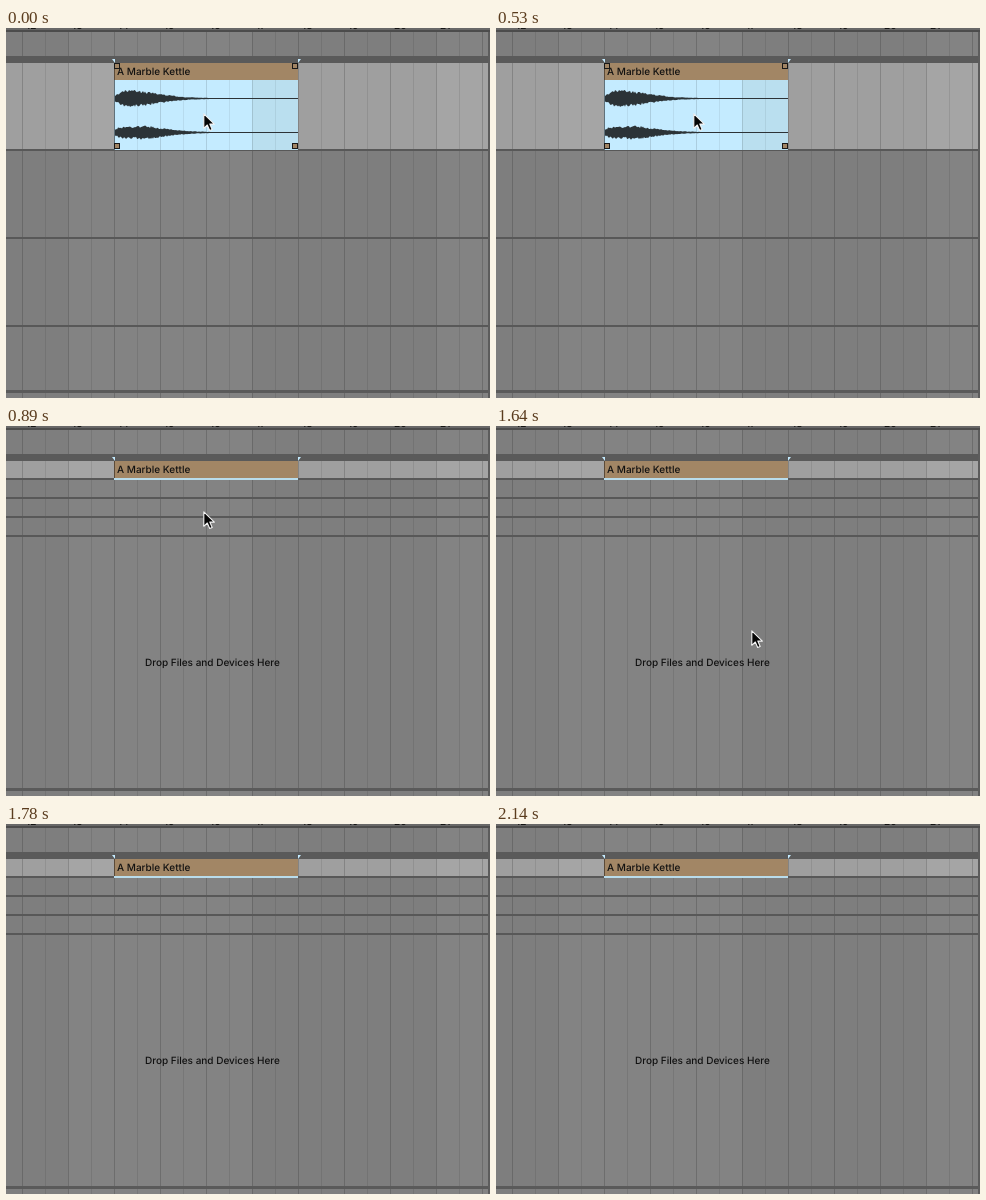
An HTML page for the animation above (2.38 s loop, 484x370 px).

```html
<!DOCTYPE html>
<html lang="en">
<head>
<meta charset="utf-8">
<title>Track fold</title>
<style>
  html, body { margin: 0; width: 100%; height: 100%; overflow: hidden; background: #808080; }
  svg { display: block; width: 484px; height: 370px; }
  text { font: 500 10px Inter, "Open Sans", sans-serif; fill: #111; text-rendering: geometricPrecision; }
  .open, .folded, #cursor { animation: 2380ms step-end infinite; }
  .open { animation-name: open; }
  .folded { animation-name: folded; }
  #cursor { animation-name: cursor; }
  @keyframes open { 0% { visibility: visible } 37.395%, 100% { visibility: hidden } }
  @keyframes folded { 0% { visibility: hidden } 37.395%, 100% { visibility: visible } }
  @keyframes cursor {
    0% { transform: translate(197px, 85px); visibility: visible }
    68.908% { transform: translate(255px, 204px); visibility: visible }
    74.79%, 100% { transform: translate(255px, 204px); visibility: hidden }
  }
</style>
</head>
<body>
<svg viewBox="0 0 484 370" shape-rendering="crispEdges">
  <defs>
    <pattern id="beats" width="46" height="370" x="16" patternUnits="userSpaceOnUse">
      <path d="M0 0h1v370h-1z" fill="#000" fill-opacity=".17"/>
      <path d="M23 0h1v370h-1z" fill="#000" fill-opacity=".09"/>
    </pattern>
    <pattern id="bands" width="368" height="370" x="62" patternUnits="userSpaceOnUse">
      <path d="M184 0h184v370H184z" fill="#000" fill-opacity=".04"/>
    </pattern>
    <g id="handle"><path d="M.5 .5h5v5h-5z" fill="#a08464" stroke="#181818"/></g>
  </defs>

  <path d="M0 0h484v370H0z" fill="#838383"/>
  <path class="open" d="M0 35h482v86H0z" fill="#a5a5a5"/>
  <path class="folded" d="M0 35h482v17H0z" fill="#a5a5a5"/>
  <path d="M0 3h482v367H0z" fill="url(#bands)"/>
  <path d="M0 3h482v367H0z" fill="url(#beats)"/>

  <path d="M0 0h484v2H0z" fill="#686868"/>
  <path d="M0 2h484v2H0z" fill="#4c4c4c"/>
  <g id="bars"></g>
  <path d="M0 28h484v7H0zM0 362h484v3H0z" fill="#5a5a5a"/>
  <path class="open" d="M0 121h482v2H0zM0 209h482v2H0zM0 297h482v2H0z" fill="#585858"/>
  <path class="folded" d="M0 52h482v2H0zM0 71h482v2H0zM0 90h482v2H0zM0 109h482v2H0z" fill="#585858"/>
  <path d="M482 4h2v366h-2z" fill="#5c5c5c"/>

  <path d="M108 35h184v17H108z" fill="#a28665"/>
  <path d="M108 35h1v17h-1z" fill="#5b4a38"/>
  <g class="open">
    <path d="M108 52h184v70H108z" fill="#c4ebff"/>
    <path d="M246 52h46v70h-46z" fill="#badfef"/>
    <path d="M109 52h183v70H109z" fill="url(#beats)" opacity=".75"/>
    <path d="M108 52h1v70h-1z" fill="#60717a"/>
    <g id="waves" fill="#2c3337" shape-rendering="auto"></g>
  </g>
  <path class="folded" d="M108 52h184v2H108z" fill="#b9dceb"/>
  <path d="M106 31h3v4zM295 31h-3v4z" fill="#c4ebff" shape-rendering="auto"/>
  <text x="111" y="47">A Marble Kettle</text>
  <g class="open">
    <use href="#handle" x="108" y="35"/>
    <use href="#handle" x="286" y="35"/>
    <use href="#handle" x="108" y="115"/>
    <use href="#handle" x="286" y="115"/>
  </g>
  <text class="folded" x="139" y="240">Drop Files and Devices Here</text>

  <g id="cursor" shape-rendering="auto">
    <path d="M.8 .8V15.3L4.3 12L6.7 17.5L9.2 16.4L6.8 11.1H11.4Z"
      fill="#050505" stroke="#f4f4f4" stroke-width="1.1" stroke-linejoin="round"/>
  </g>
</svg>
<script>
  const NS = "http://www.w3.org/2000/svg";

  function add(parent, tag, attrs, label = "") {
    const node = document.createElementNS(NS, tag);
    for (const key in attrs) node.setAttribute(key, attrs[key]);
    node.textContent = label;
    document.getElementById(parent).append(node);
  }

  for (let bar = 12; bar < 22; bar++) {
    add("bars", "text", { x: 20 + (bar - 12) * 46, y: 1 }, bar);
  }

  // Linear interpolation through [x, amplitude] points.
  function level(points, x) {
    const i = points.findIndex(p => p[0] >= x);
    if (i < 1) return points[0][1];
    const [x0, a0] = points[i - 1], [x1, a1] = points[i];
    return a0 + (a1 - a0) * (x - x0) / (x1 - x0);
  }

  function wave(mid, points, seed) {
    const noise = () => (seed = seed * 16807 % 2147483647) / 2147483647;
    const top = [], bottom = [];
    for (let x = 109; x <= 292; x++) {
      const amp = level(points, x);
      top.push(`${x} ${mid - Math.max(.5, amp * (.72 + .4 * noise()))}`);
      bottom.unshift(`${x} ${mid + Math.max(.5, amp * (.72 + .4 * noise()))}`);
    }
    add("waves", "path", { d: `M${top.join("L")}L${bottom.join("L")}Z` });
  }

  wave(70.5, [[109, 3], [113, 5], [119, 8], [127, 8.5], [133, 7], [140, 6.5], [150, 5],
    [160, 3.8], [172, 2], [184, 1.2], [205, .5], [292, .4]], 4711);
  wave(104.5, [[109, 3], [113, 5], [121, 6.5], [130, 5.5], [139, 7.5], [148, 5.5],
    [160, 4], [172, 2.2], [184, 1.4], [205, .5], [292, .4]], 9203);
</script>
</body>
</html>
```
